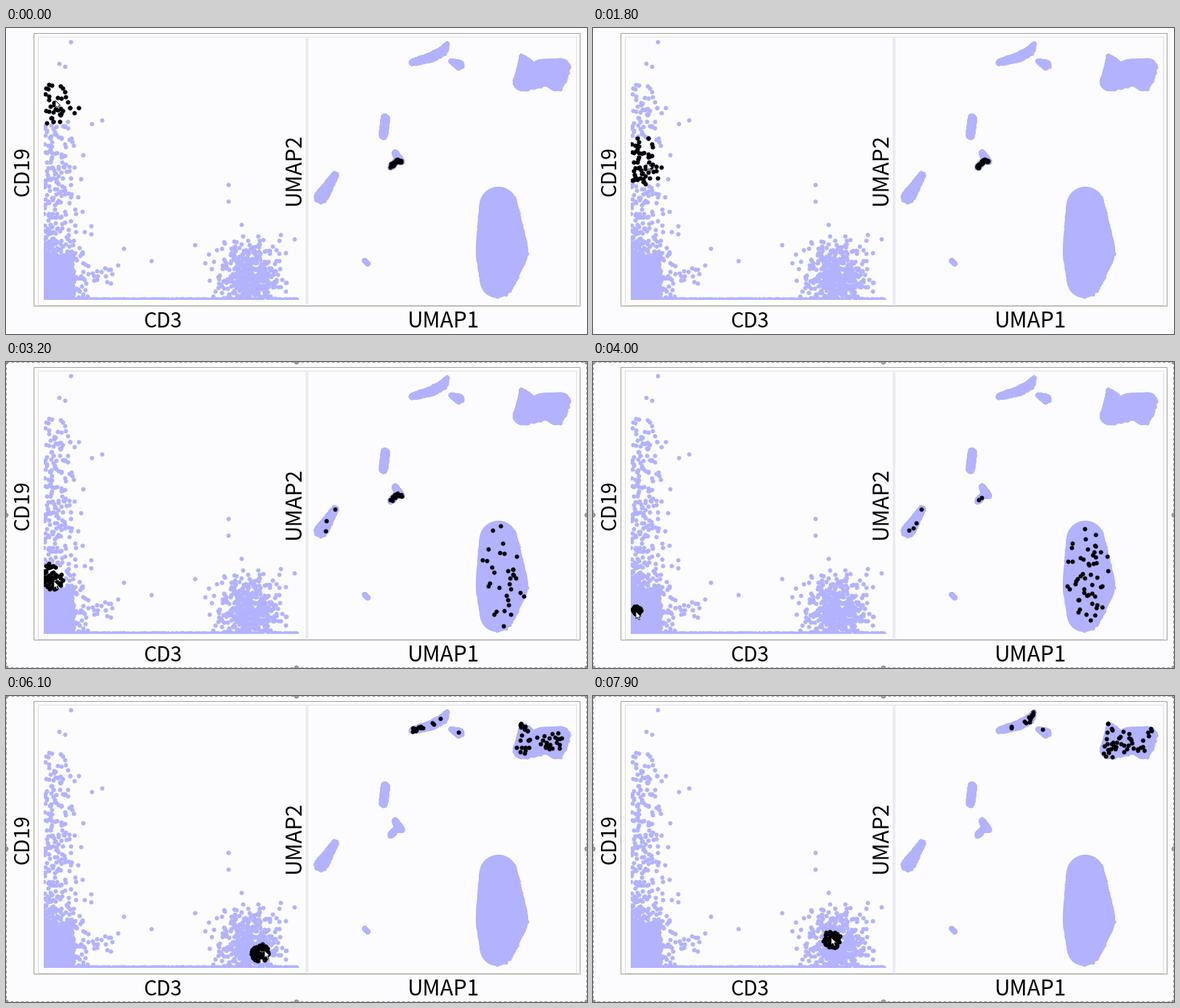
A matplotlib script that plays this animation: 800 by 422 pixels, repeating every 8 s.

```python
import numpy as np
import matplotlib.pyplot as plt
from matplotlib.animation import FuncAnimation
from matplotlib.patches import Circle, Polygon, Rectangle

W, H, DPI = 800, 422, 100
STEP, FRAMES = 100, 80
PX = 72 / DPI
PAPER, LILAC, BLACK = "#fcfcfe", "#b2b2ff", "#000000"
LEFT, FLOOR = 52, 374
MAX_PICKED, REACH = 58, 40
SELECT_BOX_AT = 2200

rng = np.random.default_rng(19)

# UMAP islands: chains of discs (x, y, radius)
ISLANDS = {
    "big": [(678, 245, 27), (683, 308, 37), (676, 349, 24)],
    "plate": [(709, 38, 3), (716, 54, 13), (709, 76, 12), (738, 62, 20),
              (765, 54, 13), (757, 75, 13)],
    "ridge": [(559, 47, 5), (585, 40, 7), (602, 31, 7), (607, 21, 3)],
    "tail": [(612, 45, 3), (624, 51, 7)],
    "bean": [(522, 123, 6), (519, 148, 6)],
    "wedge": [(535, 171, 4), (541, 182, 6)],
    "core": [(545, 184, 4), (538, 182, 4), (530, 191, 5)],
    "boot": [(453, 202, 5), (441, 221, 8), (433, 233, 10)],
    "crumb": [(493, 320, 3), (498, 325, 3)],
}


def chain(name, n=60):
    """Discs spread evenly along an island's spine."""
    keys = np.array(ISLANDS[name], float)
    s = np.r_[0, np.cumsum(np.hypot(*np.diff(keys[:, :2], axis=0).T))]
    at = np.linspace(0, s[-1], n)
    return np.c_[tuple(np.interp(at, s, k) for k in keys.T)]


DISCS = {name: chain(name) for name in ISLANDS}


def sample(name):
    """One random cell position inside an island."""
    x, y, r = rng.choice(DISCS[name])
    a, d = rng.uniform(0, 2 * np.pi), (r - 2.5) * np.sqrt(rng.random())
    return x + d * np.cos(a), y + d * np.sin(a)


def island_for(x, y):
    """Pick an island for a cell from its marker levels."""
    if x > 230:
        names, odds = ("plate", "ridge", "tail"), (.76, .2, .04)
    elif x > 117 and y > 300:
        names, odds = ("bean", "boot", "big"), (.3, .2, .5)
    elif y < 225:
        return "core"
    elif y < 300:
        names, odds = ("core", "boot", "big"), (.74, .06, .2)
    else:
        names, odds = ("big", "boot", "core"), (.91, .07, .02)
    return rng.choice(names, p=odds)


def half_normal(n, scale):
    return np.abs(rng.normal(0, scale, n))


def within(pts, x0, x1, y0, y1=FLOOR):
    x, y = pts.T
    return pts[(x >= x0) & (x <= x1) & (y >= y0) & (y <= y1)]


def make_cells():
    loners = [(89, 19), (73, 49), (81, 53), (132, 127), (162, 304),
              (200, 321), (260, 299), (306, 216), (306, 239), (397, 291)]
    n = 235
    column = np.c_[LEFT + half_normal(n, 24),
                   74 + 238 * rng.random(n) ** .85]
    n = 850
    block = np.c_[rng.uniform(LEFT, 92, n), rng.uniform(313, FLOOR, n)]
    n = 340
    halo = np.c_[LEFT + half_normal(n, 31), FLOOR - half_normal(n, 38)]
    between = np.c_[119 + half_normal(15, 28), rng.uniform(322, 356, 15)]
    n = 500
    right = np.c_[rng.normal(337, 21, n), FLOOR - 29 + rng.normal(0, 25, n)]
    n = 250
    floor = np.c_[rng.uniform(LEFT, 405, n), np.full(n, FLOOR)]
    return np.vstack([loners, within(column, LEFT, 122, 0), block,
                      within(halo, LEFT, 115, 265),
                      within(between, 119, 184, 0),
                      within(right, 272, 390, 264), floor])


# time, selection centre, pointer tip
TRACK = np.array([
    (0, 66, 93, 68, 100),
    (1100, 68, 112, 77, 107),
    (2500, 67, 255, 72, 265),
    (4000, 60, 342, 59, 344),
    (5000, 154, 343, 171, 344),
    (6100, 349, 354, 356, 351),
    (7900, 329, 335, 328, 333),
])


def track(t):
    cx, cy, px, py = (np.interp(t, TRACK[:, 0], c) for c in TRACK[:, 1:].T)
    return (cx, cy), (px, py)


cells = make_cells()
homes = np.array([sample(island_for(x, y)) for x, y in cells])


def pick(centre):
    """Cells nearest to the pointer, within reach."""
    gap = np.hypot(*(cells - centre).T)
    ids = np.argsort(gap, kind="stable")[:MAX_PICKED]
    return ids[gap[ids] < REACH]


fig = plt.figure(figsize=(W / DPI, H / DPI), dpi=DPI, facecolor=PAPER)
ax = fig.add_axes([0, 0, 1, 1])
ax.set(xlim=(0, W), ylim=(H, 0))
ax.axis("off")


def box(x0, y0, x1, y1, color, **kw):
    return ax.add_patch(Rectangle((x0 + .5, y0 + .5), x1 - x0, y1 - y0,
                                  fill=False, ec=color, lw=PX, snap=False,
                                  **kw))


def dots(pts, color, z):
    return ax.plot(*np.transpose(pts), "o", ms=6 * PX, mew=0, color=color,
                   zorder=z)[0]


def label(x, y, text, size, angle=0):
    ax.text(x, y, text, family="Noto Sans CJK JP", size=size * PX,
            weight=500, color=BLACK, rotation=angle, rotation_mode="anchor",
            ha="center", va="baseline")


def draw_island(discs):
    """Solid body with a rim of single cells."""
    x, y, r = discs.T
    ax.scatter(x, y, s=(2 * (r - .8) * PX) ** 2, c=LILAC, lw=0, zorder=2)
    a = rng.uniform(0, 2 * np.pi, (4, len(r)))
    rim = np.c_[(x + (r - 2.6) * np.cos(a)).ravel(),
                (y + (r - 2.6) * np.sin(a)).ravel()]
    dots(rim, LILAC, 2)


box(38, 7, 790, 383, "#a3a395")
box(44, 12, 413, 382, "#dcdce6")
box(415, 12, 785, 382, "#dcdce6")
label(216, 413, "CD3", 28.3)
label(602, 413, "UMAP1", 29.8)
label(31, 198, "CD19", 28.3, 90)
label(405, 195, "UMAP2", 29.8, 90)

for discs in DISCS.values():
    draw_island(discs)

plot_area = Rectangle((51.5, 12), 355, FLOOR - 12.5, transform=ax.transData)
all_cells = dots(cells, LILAC, 2)
picked = dots(cells[:1], BLACK, 3)
for art in (all_cells, picked):
    art.set_clip_path(plot_area)
picked_umap = dots(homes[:1], BLACK, 3)

ARROW = np.array([(0, 0), (0, 10), (2.3, 7.9), (4, 11.5), (5.6, 10.8),
                  (4.1, 7.3), (7, 7)])
pointer = ax.add_patch(Polygon(ARROW, fc="white", ec="#202020", lw=.9 * PX,
                               zorder=5))

select_box = [box(0, 0, W - 1, H - 1, "#9c9c9c", ls=(0, (4, 3)), zorder=6)]
for hx in (0, W / 2, W):
    for hy in (0, H / 2, H):
        if (hx, hy) != (W / 2, H / 2):
            select_box.append(ax.add_patch(
                Circle((hx, hy), 3, fc="#a0a0a0", ec="#808080", lw=.6,
                       zorder=7)))


def draw(i):
    t = i * STEP
    centre, tip = track(t)
    ids = pick(centre)
    picked.set_data(*cells[ids].T)
    picked_umap.set_data(*homes[ids].T)
    pointer.set_xy(ARROW + tip)
    for art in select_box:
        art.set_visible(t >= SELECT_BOX_AT)
    return [picked, picked_umap, pointer, *select_box]


anim = FuncAnimation(fig, draw, frames=FRAMES, interval=STEP, repeat=True,
                     repeat_delay=0, blit=False)
plt.show()
```
